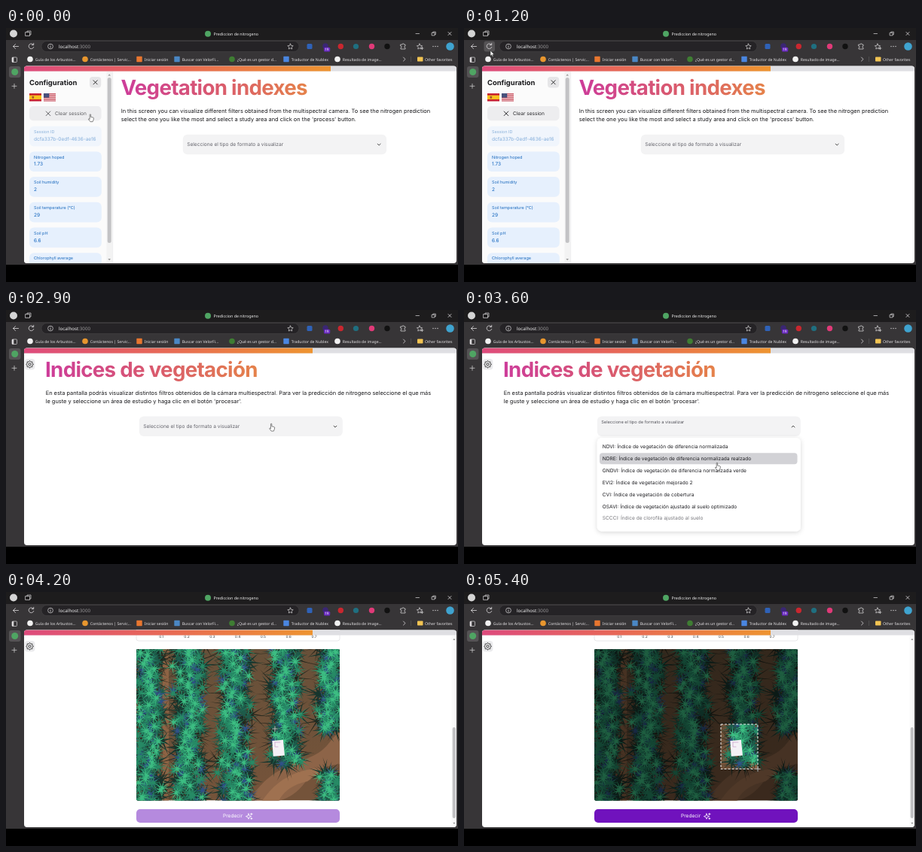
Animation of 600x338 px, one loop 5.5 s. Source, as an HTML page:

```html
<!DOCTYPE html>
<html lang="en">
<head>
<meta charset="utf-8">
<title>Prediccion de nitrogeno</title>
<style>
html, body { margin: 0; width: 100%; height: 100%; overflow: hidden; background: #000; }
svg { display: block; width: 600px; height: 338px; }
text { font-family: Inter, sans-serif; text-rendering: geometricPrecision; white-space: pre; }
.ui { font-family: "Noto Sans", "Open Sans", sans-serif; }
.title { font-size: 27.7px; font-weight: 700; letter-spacing: -.025em; }
.line { fill: none; stroke-linecap: round; stroke-linejoin: round; }
</style>
</head>
<body>
<svg id="stage" viewBox="0 0 600 338" xmlns="http://www.w3.org/2000/svg"></svg>
<script>
const LOOP = 5500, STEP = 100, MAX_SCROLL = 253;
const stage = document.getElementById('stage');

// markup helpers
const rect = (x, y, w, h, fill, r = 0, more = '') =>
  `<rect x="${x}" y="${y}" width="${w}" height="${h}" rx="${r}" fill="${fill}" ${more}/>`;
const circle = (x, y, r, fill, more = '') => `<circle cx="${x}" cy="${y}" r="${r}" fill="${fill}" ${more}/>`;
const line = (d, color, w = .8, more = '') => `<path class="line" d="${d}" stroke="${color}" stroke-width="${w}" ${more}/>`;
const text = (x, y, s, size, fill, more = '') => `<text x="${x}" y="${y}" font-size="${size}" fill="${fill}" ${more}>${s}</text>`;
const ui = (x, y, s, size = 5.15, fill = '#e4e2e4') => text(x, y, s, size, fill, 'class="ui"');
const group = (id, body, more = '') => `<g id="${id}" ${more}>${body}</g>`;
const cross = (x, y, r, color, w) => line(`M${x - r} ${y - r}l${2 * r} ${2 * r}m0 ${-2 * r}l${-2 * r} ${2 * r}`, color, w);

function chrome() {
  const pale = '#dddbdd';
  const marks = [
    [32, 'Guía de los Arbustos...', '#f1f1f1', 0], [105, 'Contáctenos | Servic...', '#e8962e', 0],
    [177, 'Iniciar sesión', '#e8762f', 1], [227, 'Buscar con VelorFi...', '#4a87c4', 1],
    [300, '¿Qué es un gestor d...', '#3f7d33', 0], [372, 'Traductor de Nublex', '#4a86e0', 1],
    [440, 'Resultado de image...', '#f1f1f1', 0]
  ];
  let s = rect(0, 0, 600, 315, '#373537') + rect(0, 0, 600, 16, '#1d1c1d');
  s += circle(10, 7.5, 5, '#d4d4d4');
  s += line('M26 5.5h5.5v5h-5.5zM28 5.5v-1.5h5v5h-1.5', pale, .7);
  s += circle(268, 7.7, 4, '#4fa563') + ui(275.5, 9.8, 'Prediccion de nitrogeno', 5.3, '#f0f0f0');
  s += line('M544 7.5h4.5M565.5 6.3h3.6v3.6h-3.6zM566.8 6.2v-1.1h3.5v3.5h-1', pale, .7) + cross(589, 7.5, 2, pale, .8);
  s += group('reloadHover', rect(26.5, 17.5, 14.5, 14, '#555355', 3));
  s += line('M16.5 24.5h-7m3-3l-3 3l3 3', pale, .8);
  s += line('M36.3 22.2a3.4 3.4 0 1 0 .5 3.2M36.7 20.3v2.3h-2.3', pale, .8);
  s += rect(47, 17.5, 342, 14, '#252326', 7, 'stroke="#4b494b" stroke-width=".5"');
  s += circle(59, 24.5, 3.4, 'none', `stroke="${pale}" stroke-width=".7"`) + line('M59 24.3v1.8M59 22.7v.1', pale, .8);
  s += `<text class="ui" x="70" y="26.8" font-size="6.2" fill="#f2f2f2">localhost<tspan fill="#9a989a">:3000</tspan></text>`;
  const star = x => line(`M${x} 21l1.1 2.3 2.5.4-1.8 1.8.4 2.5-2.2-1.2-2.2 1.2.4-2.5-1.8-1.8 2.5-.4z`, pale, .7);
  s += star(377.5) + star(549) + line('M551 27h3m-1.5-1.5v3', pale, .7);
  s += rect(399.5, 21, 7, 7, '#2f62b8', 1.5) + circle(424, 24, 3.8, '#3a2673');
  s += rect(422, 25.8, 8.2, 5.6, '#6a2bc0', 1.5) + ui(423.2, 30.4, '19', 4.6, '#fff');
  s += circle(444.3, 24.5, 3.7, '#c9272f') + circle(464.5, 24.5, 3.6, '#1f6f80');
  s += circle(485.5, 24.5, 3.7, '#e03a78') + circle(506, 24.5, 3.7, '#111');
  s += line('M524 22h2a1.2 1.2 0 0 1 2.4 0h1.6v2a1.2 1.2 0 0 0 0 2.4v1.6h-6v-1.7a1.2 1.2 0 0 0 0-2.4z', pale, .7);
  s += [567, 570, 573].map(x => circle(x, 24.5, .65, pale)).join('') + circle(589.5, 24.5, 5.3, '#3fa3cf');
  for (const [x, label, color, square] of marks) {
    s += square ? rect(x - 3.7, 37.8, 7.4, 7.4, color, .6) : circle(x, 41.5, 3.8, color);
    s += ui(x + 6.7, 43.5, label);
  }
  s += line('M527.5 39l2.5 2.5l-2.5 2.5', pale) + rect(537.5, 38, .5, 7, '#666');
  s += rect(546, 38.5, 7.5, 6, '#f2c452', .8) + ui(556, 43.5, 'Other favorites');
  s += rect(8, 39, 6.5, 6.5, 'none', 1, `stroke="${pale}" stroke-width=".7"`) + rect(8, 39, 2.2, 6.5, pale, .5);
  s += rect(4, 51, 15.5, 15, '#555355', 3) + circle(11.7, 58.5, 4.5, '#4fa563') + line('M11 74.3v6m-3-3h6', pale, .7);
  return s + rect(24, 50.5, 574, 262.5, '#fff', 4);
}

function flags() {
  let s = rect(31, 87, 16, 10.5, '#c8202f') + rect(31, 89.6, 16, 5.3, '#f8c21c') + rect(34.5, 90.7, 2.6, 3, '#a8562e', .6);
  s += rect(50, 87, 16, 10.5, '#f6f0f0');
  for (let i = 0; i < 7; i++) s += rect(50, 87 + i * 1.615, 16, .81, '#c23244');
  s += rect(50, 87, 7.2, 5.6, '#35406f');
  for (let i = 0; i < 9; i++) s += circle(51.2 + i % 3 * 2.3, 88.1 + (i / 3 | 0) * 1.7, .35, '#fff');
  return s;
}

function sidebar() {
  const cards = [['Session ID', 'dcfa337b-0edf-4636-ae16'], ['Nitrogen hoped', '1.73'], ['Soil humidity', '2'],
    ['Soil temperature (°C)', '29'], ['Soil pH', '6.6'], ['Chlorophyll average', '41']];
  let s = rect(24, 58, 118, 256, '#fbfbfb') + rect(141.5, 58, .6, 256, '#e6e6e8');
  s += rect(133.5, 58, 7.5, 256, '#f3f3f3') + rect(134.7, 66, 5, 220, '#c3c3c5', 2.5);
  s += '<path d="M135.4 63.5l1.8-2.2l1.8 2.2zM135.4 307l1.8 2.2l1.8-2.2z" fill="#999"/>';
  s += text(31, 75.8, 'Configuration', 9.4, '#18181b', 'font-weight="700"');
  s += rect(111, 65, 15.2, 14.5, '#e6e6e8', 4) + cross(118.6, 72.3, 2.6, '#222', .9) + flags();
  s += rect(31, 104, 95.5, 19.3, '#ededef', 5);
  s += group('clear', cross(56, 113.8, 2.8, '#18181b', .9) + text(65, 116.2, 'Clear session', 6.55, '#27272a'));
  cards.forEach(([label, value], i) => {
    const y = 130.7 + i * 33.7;
    const body = rect(31, y, 95.8, 26.7, '#e6f0fd', 6) +
      text(37, y + 9.1, label, 5.5, '#1a69bd') + text(37, y + 19, value, 6.5, '#0f62bd');
    s += i ? body : `<g opacity=".5">${body}</g>`;
  });
  return s;
}

const title = (x, s) => `<text class="title" x="${x}" y="89.4" fill="url(#warm)">${s}</text>`;
const para = (x, lines) => lines.map((s, i) => text(x, 112.7 + i * 11, s, 7.4, '#18181b')).join('');
const chevron = (x, up) => line(up ? `M${x - 1.9} 156l1.9-1.9l1.9 1.9` : `M${x - 1.9} 154.2l1.9 1.9l1.9-1.9`, '#333', .9);
const PICK = 'Seleccione el tipo de formato a visualizar';

function english() {
  return title(152.5, 'Vegetation indexes') + para(152.7, [
    'In this screen you can visualize different filters obtained from the multispectral camera. To see the nitrogen prediction',
    "select the one you like the most and select a study area and click on the 'process' button."]) +
    rect(234.8, 141.8, 270.3, 26.4, '#f3f3f4', 6) + text(240.2, 157.4, PICK, 6.6, '#63636b') + chevron(495.2);
}

const OPTIONS = ['NDVI: Índice de vegetación de diferencia normalizada',
  'NDRE: Índice de vegetación de diferencia normalizada realzado',
  'GNDVI: Índice de vegetación de diferencia normalizada verde',
  'EVI2: Índice de vegetación mejorado 2', 'CVI: Índice de vegetación de cobertura',
  'OSAVI: Índice de vegetación ajustado al suelo optimizado', 'SCCCI: Índice de clorofila ajustado al suelo'];

function menu() {
  let s = rect(176.8, 170, 270, 124.5, '#fff', 6, 'filter="url(#soft)"');
  s += group('hover', rect(180, 190.2, 262.5, 15, '#d2d2d6', 4));
  OPTIONS.forEach((label, i) => { s += text(183.8, 184.2 + i * 15.87, label, 6.58, i < 6 ? '#1c1c20' : '#77777c'); });
  return s;
}

// aerial view of planted rows: a few flat tones built from seeded spikes
function field() {
  let seed = 11;
  const rnd = () => (seed = seed * 16807 % 2147483647) / 2147483647;
  const rows = [[187, 23, 70, 285], [243, 23, 70, 285], [304, 24, 70, 285], [371, 22, 70, 228], [430, 18, 70, 184], [431, 16, 240, 285]];
  // colour, reach, spacing, half width
  const tones = [['#20241b', 27, 5, .8], ['#16352d', 20, 4, 1.3], ['#1d5c4b', 15, 3.5, 1],
    ['#2f5088', 13, 8, .8], ['#268a65', 14, 3.6, .9], ['#3cbd82', 12, 5.5, .8]];
  const spikes = (x, y, r, w) => {
    let d = '';
    const turn = rnd() * 6.28;
    for (let i = 0; i < 9; i++) {
      const a = turn + i * .7 + rnd() * .3, q = r * (.6 + rnd() * .5);
      const c = Math.cos(a), n = Math.sin(a);
      d += `M${(x - n * w).toFixed(1)} ${(y + c * w).toFixed(1)}L${(x + c * q).toFixed(1)} ${(y + n * q).toFixed(1)}L${(x + n * w).toFixed(1)} ${(y - c * w).toFixed(1)}z`;
    }
    return d;
  };
  let s = rect(173, 329, 270, 201.5, 'url(#soil)');
  s += '<g transform="translate(0 253)">' + rect(208, 76, 8, 202, '#8d6344');
  s += '<path d="M322 278C345 244 362 236 396 223S425 200 443 186V229Q412 232 398 252T362 278z" fill="#8d6448"/>';
  s += '<path d="M340 278Q362 245 398 237T400 252Q372 258 362 278z" fill="#9f7150"/>';
  for (const [color, r, gap, w] of tones) {
    let d = '';
    for (const [cx, half, y0, y1] of rows)
      for (let y = y0; y < y1; y += gap) d += spikes(cx + (rnd() + rnd() - 1) * half, y + rnd() * gap, r, w);
    s += `<path d="${d}" fill="${color}"/>`;
  }
  s += '<path d="M353.3 198l14.6-1.3l2 20.8l-15.2 1.2z" fill="#f4f1f6"/>' + line('M357 200h7m-7 0v6h4', '#c08cc0', .6);
  return s + '</g>';
}

function results() {
  let s = rect(173, 184, 270, 134, '#fff', 3, 'stroke="#e2e2e5" stroke-width=".8"');
  for (let i = 1; i < 8; i++) s += text(172.4 + i * 33.8, 313.8, '0.' + i, 4.9, '#333', 'text-anchor="middle"');
  s += `<g clip-path="url(#photo)">${field()}<path id="dim" fill="#000" fill-opacity=".5" fill-rule="evenodd"/></g>`;
  s += '<rect id="area" fill="none" stroke="#fff" stroke-width=".9" stroke-dasharray="3 2"/>';
  s += rect(173, 542, 270, 18, '#b58ade', 5, 'id="button"');
  s += text(288, 553.3, 'Predecir', 6.6, '#fff');
  s += line('M322 548l1 2.6 2.6 1-2.6 1-1 2.6-1-2.6-2.6-1 2.6-1zM325.8 547.3v2.4m-1.2-1.2h2.4M325.8 553.5v2m-1-1h2', '#fff', .8);
  return s;
}

function gear(x, y) {
  let d = '';
  for (let i = 0; i < 64; i++) {
    const a = i * Math.PI / 32, r = 4.1 + .6 * Math.cos(8 * a);
    d += `${i ? 'L' : 'M'}${(x + r * Math.cos(a)).toFixed(2)} ${(y + r * Math.sin(a)).toFixed(2)}`;
  }
  return rect(x - 6.8, y - 7.3, 13.7, 14.6, '#ebebed', 4) + line(d + 'z', '#222', .9) +
    circle(x, y, 1.6, 'none', 'stroke="#222" stroke-width=".9"');
}

function spanish() {
  const head = title(52, 'Indices de vegetación') + para(52.7, [
    'En esta pantalla podrás visualizar distintos filtros obtenidos de la cámara multiespectral. Para ver la predicción de nitrogeno seleccione el que más',
    "le guste y seleccione un área de estudio y haga clic en el botón 'procesar'."]);
  const select = rect(176.8, 141.6, 270, 26.5, '#f3f3f4', 6, 'id="box"') +
    group('idle', text(182.3, 157.4, PICK, 6.6, '#63636b')) +
    group('small', text(182.2, 150.9, PICK, 5.68, '#55555c')) +
    group('chosen', text(182.3, 162, OPTIONS[1], 6.58, '#18181b')) +
    group('down', chevron(437)) + group('up', chevron(437, true));
  const bar = rect(591.5, 58, 7, 256, '#fafafa') + rect(592.7, 66, 4.2, 121, '#c1c1c3', 2.1, 'id="thumb"') +
    '<path d="M593.2 64l1.7-2.2l1.7 2.2zM593.2 306.8l1.7 2.2l1.7-2.2z" fill="#999"/>';
  return group('page', head + select + group('results', results()) + group('menu', menu())) +
    gear(31.5, 72.3) + group('scrollbar', bar);
}

function cursors() {
  const edge = 'fill="#fff" stroke="#333" stroke-width=".6" stroke-linejoin="round"';
  return group('arrow', `<path d="M-1.5-3.5v7.2l1.7-1.5 1.1 2.5 1.2-.5-1.1-2.5h2.2z" ${edge}/>`) +
    group('hand', `<path d="M-1.8-4a.7.7 0 0 1 1.4 0v3l3 .6q1 .3.8 1.4l-.5 2.2-.8 2h-3.2l-2.3-3q-.4-1 .6-.9l1 .7z" ${edge}/>`) +
    group('plus', line('M-3.2 0h6.4M0-3.2v6.4', '#444', 1.2) + line('M-3.2 0h6.4M0-3.2v6.4', '#eee', .6));
}

stage.innerHTML = `<defs>
<linearGradient id="warm"><stop stop-color="#cd3c9a"/><stop offset=".5" stop-color="#d9596f"/><stop offset="1" stop-color="#e5824a"/></linearGradient>
<linearGradient id="fill"><stop stop-color="#de4b7d"/><stop offset=".5" stop-color="#e86a55"/><stop offset="1" stop-color="#ee9430"/></linearGradient>
<linearGradient id="soil" x2=".2" y2="1"><stop stop-color="#655039"/><stop offset="1" stop-color="#74533a"/></linearGradient>
<filter id="soft" x="-10%" y="-10%" width="120%" height="125%"><feDropShadow dx="0" dy="1.5" stdDeviation="3" flood-opacity=".16"/></filter>
<clipPath id="view"><rect x="24" y="50.5" width="574" height="262.5" rx="4"/></clipPath>
<clipPath id="photo"><rect x="173" y="329" width="270" height="201.5" rx="2"/></clipPath>
</defs>` + rect(0, 0, 600, 338, '#000') + chrome() +
  `<g clip-path="url(#view)">${group('en', english() + sidebar())}${group('es', spanish())}` +
  group('progress', rect(24, 50.5, 574, 7, '#dfdfe3') + rect(24, 50.5, 383, 7, 'url(#fill)', 0, 'id="done"')) + '</g>' + cursors();

const el = {};
stage.querySelectorAll('[id]').forEach(n => { el[n.id] = n; });
const show = (id, on) => el[id].setAttribute('display', on ? 'inline' : 'none');
const set = (id, attrs) => { for (const k in attrs) el[id].setAttribute(k, attrs[k]); };
const part = (t, a, b) => Math.min(1, Math.max(0, (t - a) / (b - a)));
const ease = p => p * p * (3 - 2 * p);
const out = p => 1 - (1 - p) ** 3;

// pointer stops: time, x, y
const PATH = [[0, 113, 119.5], [500, 113, 119.5], [1100, 36.5, 33.5], [1400, 36.5, 33.5], [2000, 360, 150], [2600, 360, 150],
  [3000, 352, 157], [3200, 350, 157], [3500, 337, 208], [3800, 337, 208], [4200, 357, 182], [4500, 357, 182],
  [4800, 341, 176], [4900, 341, 176], [5400, 390, 235.5]];
function pointer(t) {
  const i = Math.max(1, PATH.findIndex(p => p[0] >= t));
  const [a, ax, ay] = PATH[i - 1], [b, bx, by] = PATH[i];
  const k = ease(part(t, a, b));
  return [ax + (bx - ax) * k, ay + (by - ay) * k];
}

function draw(t) {
  const before = t < 1500, loaded = t >= 2400, open = t >= 3200 && t < 3800, picked = t >= 3800;
  const [x, y] = pointer(t);
  show('en', before);
  show('es', loaded);
  show('progress', before || loaded);
  set('done', { width: before ? 383 + 24 * (1 - out(part(t, 0, 400))) : 383 * out(part(t, 2300, 2700)) });
  set('clear', { opacity: t < 600 ? .72 : 1 });
  show('reloadHover', t >= 1000 && t < 1600);

  show('idle', !open && !picked);
  show('small', open || picked);
  show('chosen', picked);
  show('up', open);
  show('down', !open);
  show('menu', open);
  show('hover', t >= 3500);
  show('results', t >= 3900);
  show('scrollbar', t >= 3900);
  const scroll = MAX_SCROLL * ease(part(t, 3850, 4150));
  set('page', { transform: `translate(0 ${-scroll})` });
  set('thumb', { y: 66 + 114 * scroll / MAX_SCROLL });

  const drag = t > 4900, w = x - 341, h = y - 176;
  show('dim', drag);
  show('area', drag);
  if (drag) {
    set('dim', { d: `M173 329h270v202h-270zM341 429h${w}v${h}h${-w}z` });
    set('area', { x: 341, y: 429, width: w, height: h });
  }
  set('button', { fill: drag ? '#7012bd' : '#b58ade' });

  const kind = t >= 4100 ? 'plus' : t < 600 || t >= 2400 ? 'hand' : 'arrow';
  for (const id of ['arrow', 'hand', 'plus']) show(id, id === kind);
  set(kind, { transform: `translate(${x} ${y})` });
}

const start = performance.now();
function tick() {
  const t = (performance.now() - start) % LOOP;
  draw(Math.floor(t / STEP) * STEP);
  requestAnimationFrame(tick);
}
tick();
</script>
</body>
</html>
```
